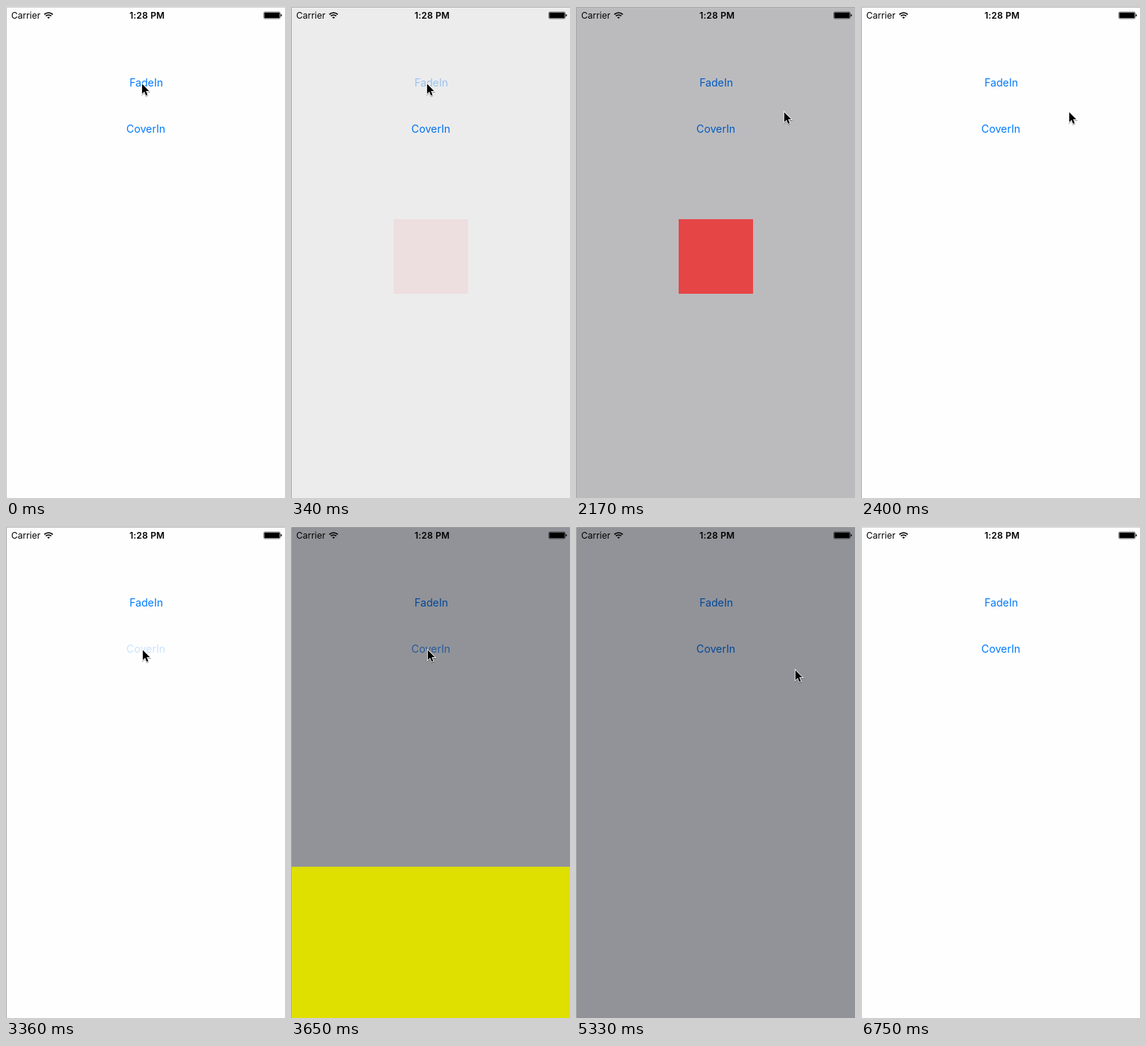
Animation of 375x660 px, one loop 6780 ms. Source, as an HTML page:

```html
<!DOCTYPE html>
<html lang="en">
<head>
<meta charset="utf-8">
<title>FadeIn and CoverIn</title>
<style>
  html, body { margin: 0; width: 100%; height: 100%; overflow: hidden; background: #fefefe; }
  svg { display: block; width: 375px; height: 660px; font-family: Inter, Roboto, sans-serif; }
  .link { font-size: 14.2px; fill: #007aff; text-anchor: middle; }
  .bar { font-size: 12px; }
</style>
</head>
<body>
<svg viewBox="0 0 375 660">
  <clipPath id="wedge"><path d="M0 0L-9 -9H9Z"/></clipPath>
  <rect width="375" height="660" fill="#fefefe"/>
  <text id="fade" class="link" x="188.5" y="107.5">FadeIn</text>
  <text id="cover" class="link" x="188" y="170">CoverIn</text>
  <rect id="dim" x="1" y="2" width="374" height="658" fill="rgb(4,6,18)"/>
  <rect id="square" x="138" y="286" width="100" height="100" fill="#f00"/>
  <rect id="sheet" x="1" width="374" height="291"/>

  <g class="bar">
    <text x="7" y="17">Carrier</text>
    <text x="189.7" y="17" text-anchor="middle" font-weight="600" letter-spacing=".2">1:28 PM</text>
    <g transform="translate(57.2 17)" clip-path="url(#wedge)" fill="none" stroke="#000" stroke-width="1.7">
      <circle r="8"/>
      <circle r="5"/>
      <circle r="1.2" stroke-width="2.4"/>
    </g>
    <rect x="346.5" y="8" width="22" height="9" rx="1.5" fill="none" stroke="#000" stroke-width=".5"/>
    <rect x="347.3" y="8.8" width="20.4" height="7.4" rx=".8"/>
    <path d="M369.3 10.8Q370.8 11 370.8 12.5T369.3 14.2Z"/>
  </g>

  <path id="frame" d="M.5 660V1.5H375" fill="none" stroke="currentColor"/>
  <rect width="375" height="1" fill="#e0e0e0"/>

  <path id="cursor" d="M.9 1.5V14.8L4 11.8L6.1 17L8.2 16.1L6.1 11.1H10.3Z" stroke="#fff" stroke-width="1.6"
        paint-order="stroke" style="filter: drop-shadow(0 1px .6px #0006)"/>
</svg>
<script>
const LOOP = 6780;
const $ = id => document.getElementById(id);
const ramp = (t, from, to) => Math.min(1, Math.max(0, (t - from) / (to - from)));
const smooth = (t, from, to) => {
  const x = ramp(t, from, to);
  return x * x * (3 - 2 * x);
};
const easeOut = (t, from, to) => 1 - (1 - ramp(t, from, to)) ** 1.82;

const moves = [
  { from: 580, to: 1100, x: 279, y: 141 },
  { from: 2640, to: 3180, x: 183, y: 165 },
  { from: 4050, to: 4500, x: 294, y: 192 },
  { from: 5580, to: 5860, x: 351, y: 561 },
  { from: 5990, to: 6210, x: 352, y: 602 }
];

function pointer(t) {
  let x = 182, y = 103;
  for (const m of moves) {
    const k = smooth(t, m.from, m.to);
    x += (m.x - x) * k;
    y += (m.y - y) * k;
  }
  return [x, y];
}

// A tapped link goes faint, then recovers
const linkAlpha = (t, tap) => t < tap ? 1 : .2 + .8 * easeOut(t, tap + 60, tap + 560);

function draw(t) {
  const active = t >= 50 && t < 6750;
  $('frame').style.color = active ? '#a8a8a8' : '#c2c2c2';
  $('fade').style.opacity = linkAlpha(t, 230);
  $('cover').style.opacity = linkAlpha(t, 3360);

  const fadeOut = 1 - smooth(t, 2010, 2400);
  const coverDim = smooth(t, 3380, 3640) * (1 - smooth(t, 5335, 5690));
  $('dim').style.opacity = .43 * (smooth(t, 250, 600) * fadeOut + coverDim);
  $('square').style.opacity = smooth(t, 250, 860) * fadeOut;

  // The sheet brightens as it rises
  const rise = easeOut(t, 3420, 3900) * (1 - smooth(t, 5000, 5325));
  const shade = 255 * (.6 + .4 * rise);
  $('sheet').setAttribute('y', 660 - 291 * rise);
  $('sheet').setAttribute('fill', `rgb(${shade},${shade},0)`);

  $('cursor').setAttribute('transform', `translate(${pointer(t)})`);
  $('cursor').style.display = t < 6750 ? '' : 'none';
}

const start = performance.now();
function tick() {
  draw((performance.now() - start) % LOOP);
  requestAnimationFrame(tick);
}
tick();
</script>
</body>
</html>
```
